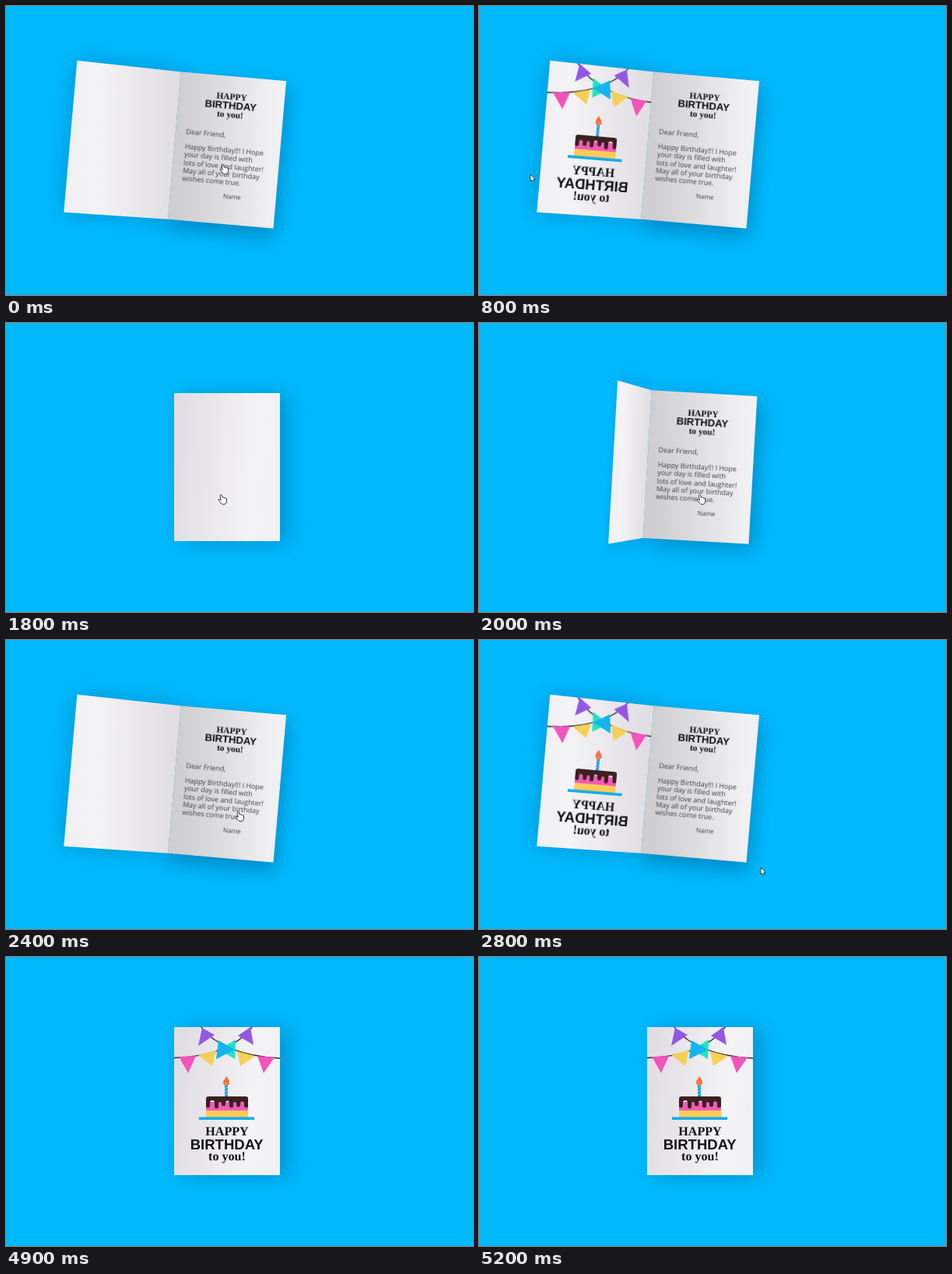
Write an HTML page that moves like this. It is 600 px wide and 371 px high and loops after 5300 ms.

```html
<!DOCTYPE html>
<html lang="en">
<head>
<meta charset="utf-8">
<title>Birthday card</title>
<style>
  html, body { margin: 0; width: 100%; height: 100%; overflow: hidden; background: #00b9fd; }
  #stage { position: absolute; left: 0; top: 0; width: 600px; height: 371px; overflow: hidden; }
  #card { position: absolute; left: 216px; top: 90px; width: 136px; height: 190px; }
  #card > * { position: absolute; left: 0; top: 0; width: 136px; height: 190px; }
  .hinged { transform-origin: 0 50%; }
  #pointer { position: absolute; left: 0; top: 0; }
  text { text-rendering: geometricPrecision; }
  .serif { font-family: "Liberation Serif", serif; font-weight: bold; }
  .sans { font-family: "Liberation Sans", sans-serif; font-weight: bold; }
  .note { font-family: "Open Sans", "Noto Sans", sans-serif; font-size: 8.95px; fill: #3f3f42; }
  .title { fill: #111; text-anchor: middle; }
</style>
</head>
<body>
<div id="stage">
  <div id="card">
    <div id="coverShade" class="hinged"></div>
    <div id="pageShade"></div>
    <svg id="page" viewBox="216 90 136 190">
      <defs>
        <linearGradient id="pageFill" x2="1" y2="-.12">
          <stop offset="0" stop-color="#cfced0"/>
          <stop offset=".4" stop-color="#dedde0"/>
          <stop offset=".8" stop-color="#efeef0"/>
          <stop offset="1" stop-color="#f3f2f4"/>
        </linearGradient>
      </defs>
      <rect x="216" y="90" width="136" height="190" fill="url(#pageFill)"/>
      <g id="pageTitle" class="title"></g>
      <g id="note" class="note"></g>
    </svg>
    <svg id="cover" class="hinged" viewBox="216 90 136 190">
      <defs>
        <linearGradient id="coverFill" x2="1" y2=".12">
          <stop offset="0" stop-color="#dfdde1"/>
          <stop offset=".4" stop-color="#e9e7eb"/>
          <stop offset=".8" stop-color="#f4f3f5"/>
          <stop offset="1" stop-color="#f1f0f2"/>
        </linearGradient>
      </defs>
      <rect x="216" y="90" width="136" height="190" fill="url(#coverFill)"/>
      <g id="picture">
        <g fill="none" stroke="#2b2430" stroke-width="1.3">
          <path d="M250 89Q278 126 352 130"/>
          <path d="M317 89Q289 127 216 129.5"/>
        </g>
        <g id="flags"></g>
        <rect x="281" y="165" width="4" height="15" fill="#1a9de0"/>
        <path d="M281 169l4-2.5M281 173l4-2.5M281 177l4-2.5" stroke="#8fd6f5"/>
        <path d="M283 153C285 156 287 158 287 161A4 4 0 0 1 279 161C279 158 281.500 157 283 153Z" fill="#f8703f"/>
        <path d="M283 160q1.500 2 0 5q-1.500-3 0-5Z" fill="#fbb27c"/>
        <rect x="257" y="186" width="54" height="12" fill="#f25bb8"/>
        <rect x="257" y="197" width="54" height="9" fill="#fccb58"/>
        <path d="M257 191V182Q257 179 260 179H308Q311 179 311 182V191A2.500 2.500 0 0 1 306 191V188A2.500 2.500 0 0 0 301 188V190A2.500 2.500 0 0 1 296 190V188A2 2 0 0 0 292 188V191A2.500 2.500 0 0 1 287 191V187A2.500 2.500 0 0 0 282 187V189A2.500 2.500 0 0 1 277 189V188A2 2 0 0 0 273 188V192A2.500 2.500 0 0 1 268 192V187A2.500 2.500 0 0 0 262 187V191A2.500 2.500 0 0 1 257 191Z" fill="#3b2020"/>
        <rect x="248" y="205.500" width="71" height="3.500" fill="#0bacea"/>
        <g id="coverTitle" class="title"></g>
      </g>
    </svg>
  </div>
  <svg id="pointer" width="600" height="371">
    <g id="cursor" stroke-linejoin="round" stroke="#222" fill="#fff">
      <path id="arrow" stroke-width=".8" d="M0 0V9L2 7.200L3.500 10.500L5 9.800L3.600 6.700H6.300Z"/>
      <path id="hand" stroke-width=".9" d="M0 1.200Q1 -.4 2.200 1L3.200 4Q4.300 3.300 5 4.400Q6.200 3.800 6.800 4.900Q8.300 4.600 8.500 6V9.500Q8 12.500 5 13Q2 13 .5 10.500L-2.300 7.200Q-2 5.800 -.4 6.700L1.200 7.500Z"/>
    </g>
  </svg>
</div>
<script>
const LOOP = 5300, STEP = 100;
const $ = id => document.getElementById(id);

function addTitle(id, [y1, y2, y3], serifSize, sansSize) {
  $(id).innerHTML =
    `<text class="serif" x="284" y="${y1}" font-size="${serifSize}">HAPPY</text>` +
    `<text class="sans" x="283.700" y="${y2}" font-size="${sansSize}">BIRTHDAY</text>` +
    `<text class="serif" x="284" y="${y3}" font-size="${serifSize}">to you!</text>`;
}
addTitle('coverTitle', [229, 247, 260.5], 16.1, 18.5);
addTitle('pageTitle', [119.8, 132.3, 143], 11.4, 13.1);

const lines = ['Happy Birthday!!! I Hope', 'your day is filled with', 'lots of love and laughter!',
  'May all of your birthday', 'wishes come true.'];
$('note').innerHTML = '<text x="229.500" y="168.500">Dear Friend,</text>' +
  lines.map((line, i) => `<text x="229.700" y="${188 + i * 10.3}">${line}</text>`).join('') +
  '<text x="284" y="247.300" style="font-size:8.2px">Name</text>';

const flags = [
  ['#9457e2', '252,91 268,100 247,114'],
  ['#9457e2', '314,90 298,101 318,113'],
  ['#1fe3c2', '295,106 274,119 294,131'],
  ['#12b5ee', '273,107 294,119 270,131'],
  ['#f6cf55', '247,126 270,120 265,140'],
  ['#f6cf55', '297,121 320,127 301,140'],
  ['#f154ba', '222,128 244,127 234,149'],
  ['#f154ba', '323,127 345,129 331,149']
];
$('flags').innerHTML = flags.map(([fill, points]) => `<polygon fill="${fill}" points="${points}"/>`).join('');

// time, x, y of the pointer tip
const path = [
  [0, 277, 203], [200, 277, 203], [400, 235, 206], [700, 94, 214], [800, 66, 216],
  [1100, 38, 266], [1400, 40, 274], [1600, 135, 258], [1800, 275, 220],
  [2400, 297, 220], [2500, 297, 220], [2800, 362, 292], [3000, 475, 345],
  [3100, 500, 362], [3200, 474, 364], [3300, 458, 376]
];

function pointerAt(t) {
  const i = path.findIndex(key => key[0] > t);
  if (i < 0) return path[path.length - 1].slice(1);
  const [t0, x0, y0] = path[i - 1], [t1, x1, y1] = path[i];
  const k = (t - t0) / (t1 - t0);
  return [x0 + (x1 - x0) * k, y0 + (y1 - y0) * k];
}

function ramp(t, start, length) {
  const k = Math.min(1, Math.max(0, (t - start) / length));
  return k * k * (3 - 2 * k);
}

function render(t) {
  const hover = t < 800 || (t >= 1800 && t < 2800);
  const open = 1 - ramp(t, 800, 300) + ramp(t, 1800, 330) - ramp(t, 2800, 300);
  const hinge = `perspective(1366px) rotateY(${-163 * open}deg)`;

  $('card').style.transform = `rotate(${5 * open}deg)`;
  $('cover').style.transform = $('coverShade').style.transform = hinge;
  $('coverShade').style.boxShadow = `0 0 26px rgba(0,50,90,${0.28 * open})`;
  $('pageShade').style.boxShadow =
    `${10 - 8 * open}px ${2 + 8 * open}px 24px rgba(0,50,90,${0.27 + 0.1 * open})`;
  $('picture').style.display = hover ? 'none' : '';

  const [x, y] = pointerAt(t);
  $('cursor').setAttribute('transform', `translate(${x} ${y})`);
  $('hand').style.display = hover ? '' : 'none';
  $('arrow').style.display = hover ? 'none' : '';
}

const begin = performance.now();
function tick() {
  const t = (performance.now() - begin) % LOOP;
  render(Math.floor(t / STEP) * STEP);
  requestAnimationFrame(tick);
}
render(0);
tick();
</script>
</body>
</html>
```
